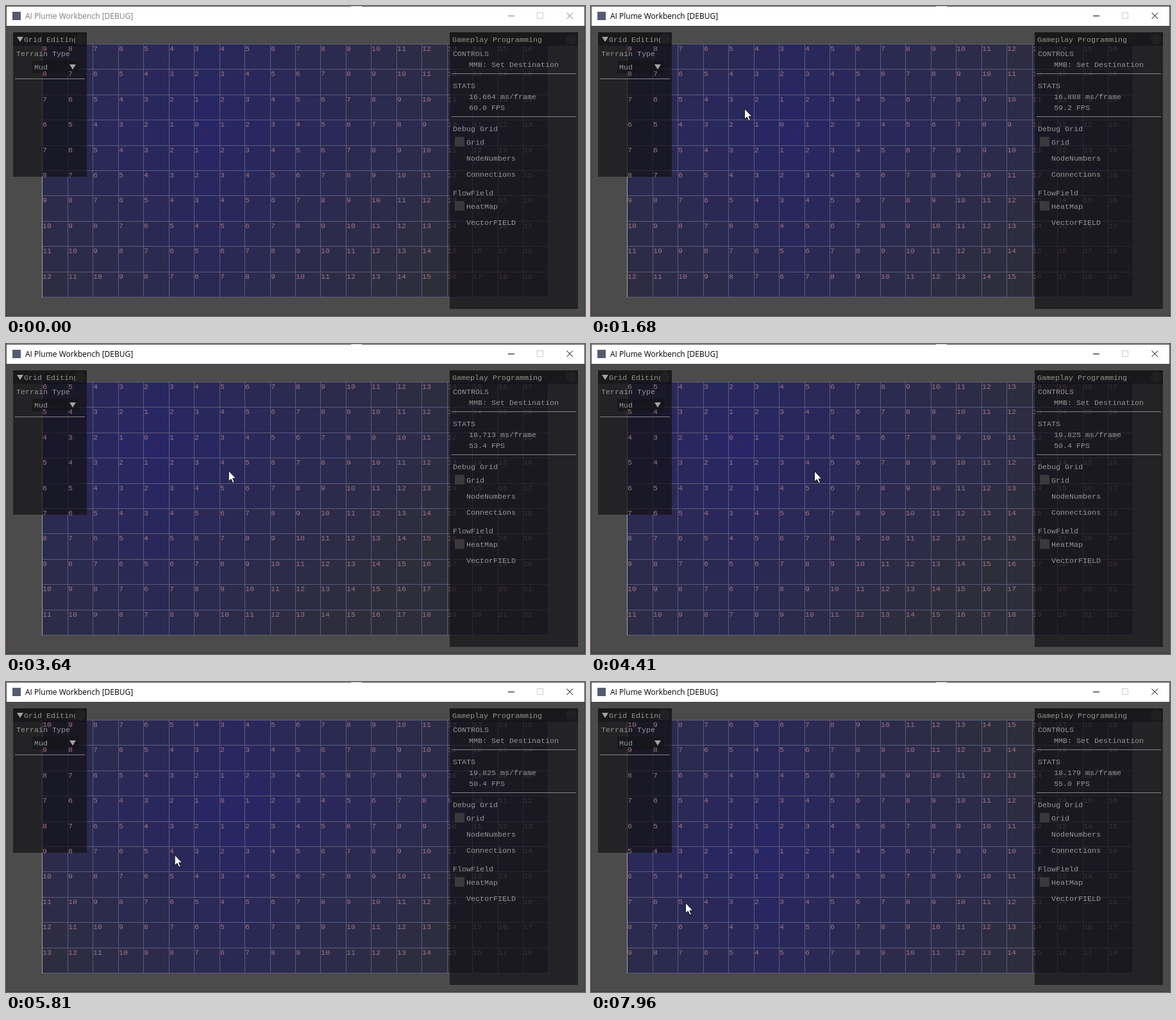
These frames come from a looping animation (903 px wide and 483 px high, 8 s). An HTML page with a canvas:

```html
<!DOCTYPE html>
<html>
<head>
<meta charset="utf-8">
<style>
  html, body { margin: 0; width: 100%; height: 100%; overflow: hidden; background: #4b4b4b; }
  canvas { display: block; }
</style>
</head>
<body>
<canvas id="stage" width="903" height="483"></canvas>
<script>
const ctx = document.getElementById('stage').getContext('2d');
const LOOP = 8000, COLS = 20, ROWS = 10;
const GRID = { x: 56.5, y: 59, dx: 39.45, dy: 39.4 };
const MONO = '11.667px "Liberation Mono", monospace';
const TEXT = '#969594', RULE = '#858487';
const ENTER_TIME = 70, FOCUS_TIME = 1400, FIRST_CLICK = 2950, CLICK_GAP = 1750, GLIDE = 700;

// Pointer stops: arrival time, x, y
const stops = [
  [70, 786, 454], [560, 254, 190], [1110, 247, 154], [1500, 239, 160],
  [3800, 348, 198], [5950, 262, 270], [7950, 147, 344]
];

const clamp01 = v => Math.min(1, Math.max(0, v));
const mix = (a, b, k) => a + (b - a) * k;
const easeOut = k => 1 - (1 - k) ** 3;
const smooth = (from, to, t) => {
  const k = clamp01((t - from) / (to - from));
  return k * k * (3 - 2 * k);
};

function pointerAt(t) {
  let [since, x, y] = stops[0];
  for (const [arrival, nextX, nextY] of stops.slice(1)) {
    const start = Math.max(since, arrival - GLIDE);
    const k = easeOut(clamp01((t - start) / (arrival - start)));
    x = mix(x, nextX, k);
    y = mix(y, nextY, k);
    since = arrival;
  }
  return [x, y];
}

// Each click makes the cell under the pointer the destination.
function goalAt(t) {
  if (t < FIRST_CLICK) return [6, 3];
  const click = t - (t - FIRST_CLICK) % CLICK_GAP;
  const [x, y] = pointerAt(click);
  return [Math.floor((x - GRID.x) / GRID.dx), Math.floor((y - GRID.y) / GRID.dy)];
}

// Frame time drifts up slowly, rises while the grid is recalculated, then recovers.
const frameCost = t => 16.664 + 0.261 * smooth(0, 2200, t)
  + 2.9 * smooth(2600, 4400, t) - 1.75 * smooth(6300, 8250, t);

function rect(x, y, w, h, color) {
  ctx.fillStyle = color;
  ctx.fillRect(x, y, w, h);
}

function shape(points, fill, stroke) {
  ctx.beginPath();
  points.forEach(([x, y]) => ctx.lineTo(x, y));
  ctx.closePath();
  ctx.fillStyle = fill;
  ctx.fill();
  if (stroke) {
    ctx.strokeStyle = stroke;
    ctx.stroke();
  }
}

function circle(x, y, r) {
  ctx.beginPath();
  ctx.arc(x, y, r, 0, 2 * Math.PI);
}

function label(text, x, middle, color = TEXT, font = MONO) {
  ctx.font = font;
  ctx.fillStyle = color;
  ctx.fillText(text, x, middle + 4);
}

const arrowDown = (x, y) => shape([[x, y], [x + 10, y], [x + 5, y + 8]], '#a3a2a1');
const colX = c => Math.round(GRID.x + c * GRID.dx - .01);
const rowY = r => Math.round(GRID.y + r * GRID.dy);
const distance = (c, r, goal) => Math.abs(c - goal[0]) + Math.abs(r - goal[1]);

function eachCell(draw) {
  for (let r = 0; r < ROWS; r++) for (let c = 0; c < COLS; c++) draw(c, r);
}

function drawTitleBar(focused) {
  const ink = focused ? '#000' : '#7c7c7c';
  rect(0, 0, 903, 1, '#56565a');
  rect(538, 0, 17, 1, '#c8c8c8');
  rect(1, 1, 901, 30, '#fff');
  rect(10, 9, 13, 13, '#565c70');
  label('AI Plume Workbench [DEBUG]', 30, 16, ink, '12px "Open Sans", sans-serif');
  rect(783, 15, 10, 1, ink);
  ctx.strokeStyle = '#ccc';
  ctx.strokeRect(828.5, 10.5, 9, 9);
  ctx.strokeStyle = ink;
  ctx.beginPath();
  ctx.moveTo(874.5, 10.5); ctx.lineTo(884, 20);
  ctx.moveTo(884, 10.5); ctx.lineTo(874.5, 20);
  ctx.stroke();
}

function drawHeatMap(goal) {
  const near = [40, 38, 102], far = [46, 46, 58];
  eachCell((c, r) => {
    const k = clamp01(distance(c, r, goal) / 15);
    const rgb = near.map((v, i) => Math.round(mix(v, far[i], k)));
    rect(colX(c), rowY(r), 40, 40, `rgb(${rgb})`);
  });
  const right = colX(COLS), bottom = rowY(ROWS);
  for (let c = 1; c <= COLS; c++) rect(colX(c), GRID.y, 1, bottom - GRID.y, '#5d5c7c');
  for (let r = 0; r <= ROWS; r++) rect(colX(0), rowY(r), right - colX(0) + 1, 1, '#5d5c7c');
  rect(colX(0), GRID.y, 1, bottom - GRID.y + 1, '#a2a2a6');

  ctx.strokeStyle = '#42254a';
  circle(GRID.x + (goal[0] + .5) * GRID.dx, GRID.y + (goal[1] + .5) * GRID.dy, 4);
  ctx.stroke();
}

function drawPanel(x, y, w, h) {
  rect(x, y, w, h, 'rgba(18,16,20,.69)');
  rect(x, y, w, 21, 'rgba(8,6,10,.35)');
  ctx.fillStyle = 'rgba(255,255,255,.035)';
  circle(x + w - 10.5, y + 10.5, 8.5);
  ctx.fill();
}

function drawEditor() {
  drawPanel(11, 41, 115, 225);
  arrowDown(17, 48);
  ctx.save();
  ctx.beginPath();
  ctx.rect(11, 41, 97, 21);
  ctx.clip();
  label('Grid Editing', 28, 52);
  ctx.restore();
  label('Terrain Type', 16, 74);
  rect(41, 85, 73, 20, 'rgba(20,19,24,.6)');
  label('Mud', 44, 95);
  arrowDown(99, 91);
  rect(14, 113, 109, 1, RULE);
}

function drawStats(cost) {
  drawPanel(692, 41, 200, 431);
  for (const y of [105, 172]) rect(695, y, 194, 1, RULE);
  for (const y of [204, 304]) rect(700, y, 15, 15, '#3a393b');
  label('Gameplay Programming', 696, 52);
  label('CONTROLS', 697, 74);
  label('MMB: Set Destination', 722, 91);
  label('STATS', 697, 124);
  label(cost.toFixed(3) + ' ms/frame', 722, 141);
  label((1000 / cost).toFixed(1) + ' FPS', 722, 158);
  label('Debug Grid', 697, 191);
  ['Grid', 'NodeNumbers', 'Connections'].forEach((name, i) => label(name, 718, 212 + 25 * i));
  label('FlowField', 697, 291);
  ['HeatMap', 'VectorFIELD'].forEach((name, i) => label(name, 718, 312 + 25 * i));
}

function drawPointer(x, y) {
  const outline = [[0, 0], [0, 16.5], [3.8, 13], [6.5, 19], [9, 18], [6.5, 12], [11.5, 12]];
  shape(outline.map(([px, py]) => [x + px + .5, y + py]), '#fff', '#111');
}

function draw(t) {
  const goal = goalAt(t);
  const focused = t >= FOCUS_TIME;
  rect(0, 0, 903, 483, '#4b4b4b');
  drawHeatMap(goal);
  drawEditor();
  eachCell((c, r) => label(distance(c, r, goal), colX(c) + 1, rowY(r) + 7, '#a27482'));
  drawStats(frameCost(t));
  drawTitleBar(focused);
  ctx.strokeStyle = '#3c3c3e';
  ctx.strokeRect(.5, 31.5, 902, 451);
  rect(0, 464, 1, 10, focused ? '#6a2a3c' : '#34346c');
  if (t >= ENTER_TIME) drawPointer(...pointerAt(t));
}

function tick() {
  draw(performance.now() % LOOP);
  requestAnimationFrame(tick);
}
tick();
</script>
</body>
</html>
```
